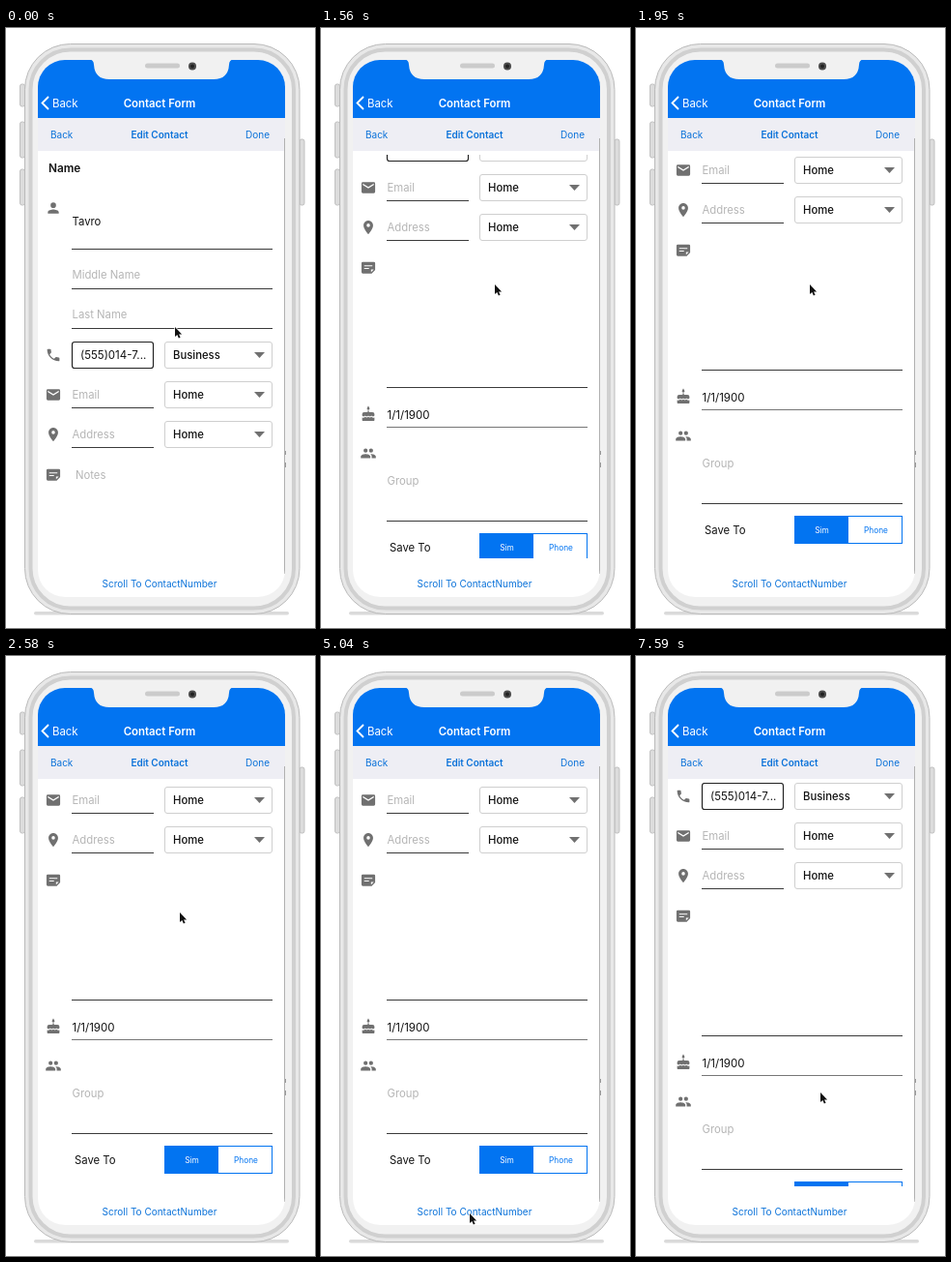
An HTML page with a canvas for the animation above (7.62 s loop, 320 px wide and 620 px high).

```html
<!DOCTYPE html>
<html lang="en">
<head>
<meta charset="utf-8">
<title>Contact form</title>
<style>
html, body { margin: 0; width: 100%; height: 100%; overflow: hidden; background: #fff; }
canvas { display: block; width: 320px; height: 620px; }
</style>
</head>
<body>
<canvas id="stage"></canvas>
<script>
const LOOP = 7620, W = 320, H = 620;
const BLUE = '#0274f1', LINK = '#0b72d9', INK = '#111', HINT = '#b5b5b5', ICON = '#707070';
const canvas = document.getElementById('stage');
const dpr = window.devicePixelRatio || 1;
canvas.width = W * dpr;
canvas.height = H * dpr;
const ctx = canvas.getContext('2d');

const icons = {
  person: 'M12 12a4 4 0 100-8 4 4 0 000 8zm0 2c-2.67 0-8 1.34-8 4v2h16v-2c0-2.66-5.33-4-8-4z',
  phone: 'M6.62 10.79c1.44 2.83 3.76 5.14 6.59 6.59l2.2-2.2c.27-.27.67-.36 1.02-.24 1.12.37 2.33.57 3.57.57.55 0 1 .45 1 1V20c0 .55-.45 1-1 1-9.39 0-17-7.61-17-17 0-.55.45-1 1-1h3.5c.55 0 1 .45 1 1 0 1.25.2 2.45.57 3.57.11.35.03.74-.25 1.02z',
  mail: 'M4 4h16a2 2 0 012 2v12a2 2 0 01-2 2H4a2 2 0 01-2-2V6a2 2 0 012-2zM20 8V6l-8 5-8-5v2l8 5z',
  place: 'M12 2C8.13 2 5 5.13 5 9c0 5.25 7 13 7 13s7-7.75 7-13c0-3.87-3.13-7-7-7zm0 9.5a2.5 2.5 0 010-5 2.5 2.5 0 010 5z',
  note: 'M4 3h16a2 2 0 012 2v10l-5 5H4a2 2 0 01-2-2V5a2 2 0 012-2zM6 8v1.5h12V8zM6 12v1.5h7V12zM16 18v-4h4z',
  cake: 'M12 6a2 2 0 002-2c0-.8-2-4-2-4s-2 3.2-2 4a2 2 0 002 2zM11 7h2v2h5a3 3 0 013 3v2q-2 2.5-4.5 0-2.2 2.5-4.5 0-2.3 2.5-4.5 0-2.5 2.5-4.5 0v-2a3 3 0 013-3h5zM3 17q2.5 1 4.5-1 2.2 2 4.5 0 2.3 2 4.5 0 2 2 4.5 1v4a1 1 0 01-1 1H4a1 1 0 01-1-1z',
  people: 'M16 11a3 3 0 100-6 3 3 0 000 6zM8 11a3 3 0 100-6 3 3 0 000 6zm0 2c-2.33 0-7 1.17-7 3.5V19h14v-2.5c0-2.33-4.67-3.5-7-3.5zm8 0l-.97.05c1.16.84 1.97 1.97 1.97 3.45V19h6v-2.5c0-2.33-4.67-3.5-7-3.5z'
};
for (const name in icons) icons[name] = new Path2D(icons[name]);
const pointer = new Path2D('M0 0V11.2L2.6 8.9 4.3 12.8 6.2 12 4.5 8.2H7.9Z');

function text(str, x, y, color = INK, size = 11.3, weight = 400, align = 'left') {
  ctx.font = `${weight} ${size}px Inter, "Open Sans", sans-serif`;
  ctx.textAlign = align;
  ctx.textBaseline = 'alphabetic';
  ctx.fillStyle = color;
  ctx.fillText(str, x, y + size * 0.363);
}

function rect(x, y, w, h, color) {
  ctx.fillStyle = color;
  ctx.fillRect(x, y, w, h);
}

function round(x, y, w, h, r, fill, stroke, width = 1) {
  ctx.beginPath();
  ctx.roundRect(x, y, w, h, r);
  if (fill) { ctx.fillStyle = fill; ctx.fill(); }
  if (stroke) { ctx.strokeStyle = stroke; ctx.lineWidth = width; ctx.stroke(); }
}

function dot(x, y, r, color) {
  ctx.beginPath();
  ctx.arc(x, y, r, 0, Math.PI * 2);
  ctx.fillStyle = color;
  ctx.fill();
}

function icon(name, y) {
  ctx.save();
  ctx.translate(49, y);
  ctx.scale(0.708, 0.708);
  ctx.translate(-12, -12);
  ctx.fillStyle = ICON;
  ctx.fill(icons[name], 'evenodd');
  ctx.restore();
}

const rule = (y, right = 276, color = '#3a3a3a') => rect(68, y, right - 68, 1, color);

function picker(label, y) {
  round(164.5, y - 13.5, 111, 27, 2.5, '#fff', '#cfcfcf');
  text(label, 173, y, INK, 11.3, 500);
  ctx.beginPath();
  ctx.moveTo(257, y - 3);
  ctx.lineTo(268, y - 3);
  ctx.lineTo(262.5, y + 3);
  ctx.fillStyle = ICON;
  ctx.fill();
}

function form(scroll) {
  ctx.save();
  ctx.beginPath();
  ctx.rect(33, 131, 256, 417);
  ctx.clip();
  ctx.translate(0, -scroll);
  text('Name', 44, 145, INK, 11.8, 600);
  icon('person', 186);
  text('Tavro', 68.5, 200);
  rule(228);
  text('Middle Name', 68.5, 255, HINT);
  rule(269);
  text('Last Name', 68.5, 296, HINT);
  rule(310);

  icon('phone', 338);
  round(68.5, 324.5, 84, 27, 2.5, '#fff', '#222', 1.2);
  text('(555)014-7...', 77, 338, INK, 11.5);
  picker('Business', 338);
  icon('mail', 379);
  text('Email', 68.5, 379, HINT);
  rule(392, 153);
  picker('Home', 379);
  icon('place', 420);
  text('Address', 68.5, 420, HINT);
  rule(433, 153);
  picker('Home', 420);

  icon('note', 462);
  if (scroll === 0) text('Notes', 72, 461.5, HINT);
  rule(585);
  icon('cake', 613);
  text('1/1/1900', 68.5, 613.5, INK, 11.5);
  rule(626, 276, '#777');
  icon('people', 653.5);
  text('Group', 68.5, 681.5, HINT);
  rule(723);
  text('Save To', 71, 751, INK, 11.3);
  rect(164, 736, 56, 29, BLUE);
  ctx.strokeStyle = BLUE;
  ctx.lineWidth = 1;
  ctx.strokeRect(164.5, 736.5, 111, 28);
  text('Sim', 192.5, 751, '#fff', 8.3, 400, 'center');
  text('Phone', 248.5, 751, BLUE, 8.3, 400, 'center');
  ctx.restore();
}

function body() {
  for (const [y, h] of [[58, 23], [97, 37], [146, 37]]) round(14.5, y, 5, h, 2, '#dcdcdc', '#c0c0c0');
  round(304, 115, 5, 68, 2, '#dcdcdc', '#c0c0c0');
  round(29, 603, 264, 3.5, 1.7, '#dadada');
  round(19.5, 16.5, 284.5, 589, 47, '#e8e8e8', '#bababa');
  round(25.5, 22.5, 272.5, 577, 41, '#f1f1f1', '#d0d0d0', 4);
}

function notch() {
  ctx.beginPath();
  ctx.moveTo(86, 32);
  ctx.quadraticCurveTo(91, 33, 91, 38);
  ctx.quadraticCurveTo(92, 53, 107, 53);
  ctx.lineTo(215, 53);
  ctx.quadraticCurveTo(230, 53, 231, 38);
  ctx.quadraticCurveTo(231, 33, 236, 32);
  ctx.fillStyle = '#f1f1f1';
  ctx.fill();
  round(144, 36.5, 36, 5, 2.5, '#cbcbcb');
  dot(193, 39.5, 4, '#4a4a4a');
  dot(193, 39.5, 2, '#222');
}

function screen(scroll) {
  ctx.save();
  ctx.beginPath();
  ctx.roundRect(33, 33, 256, 555, 28);
  ctx.clip();
  rect(33, 33, 256, 555, '#fff');
  form(scroll);
  rect(33, 33, 256, 60, BLUE);
  rect(33, 93, 256, 34, '#eeeef4');
  rect(288, 114, 1, 450, '#b0b0b0');
  ctx.restore();

  ctx.beginPath();
  ctx.moveTo(44, 71);
  ctx.lineTo(37.5, 77.5);
  ctx.lineTo(44, 84);
  ctx.strokeStyle = '#fff';
  ctx.lineWidth = 1.8;
  ctx.stroke();
  text('Back', 48, 78, '#fff', 11.4);
  text('Contact Form', 159, 78, '#fff', 11.4, 600, 'center');
  text('Back', 46, 110.5, LINK, 10);
  text('Edit Contact', 159, 110.5, LINK, 10, 600, 'center');
  text('Done', 273, 110.5, LINK, 10, 400, 'right');
  text('Scroll To ContactNumber', 159, 574, LINK, 10, 400, 'center');
  rect(289, 437, 1, 4, '#999');
  rect(289, 449, 1, 5, '#999');
}

const clamp = u => Math.max(0, Math.min(1, u));
function ease(t, from, to) {
  const u = clamp((t - from) / (to - from));
  return u * u * (3 - 2 * u);
}

// Flick to the end, rubber-band back, then glide to the phone row.
function scrollAt(t) {
  const start = 1340, hit = 1580, end = 230, speed = 0.77;
  if (t < start) return 0;
  if (t < hit) {
    const span = hit - start, u = (t - start) / span;
    return end * u * u * (3 - 2 * u)
      + span * 0.12 * u * (1 - u) ** 2
      + span * speed * u * u * (u - 1);
  }
  const s = t - hit;
  return end + speed * s * Math.exp(-s / 72) - 37 * ease(t, 5420, 5720);
}

function cursor(t) {
  const a = ease(t, 150, 1000), b = ease(t, 4150, 4950), c = ease(t, 6350, 7150);
  const x = 175 + 5 * a - 26 * b + 37 * c;
  const y = 309 - 44 * a + 311 * b - 125 * c;
  const pressed = t >= 5400 && t < 6350;
  const size = pressed ? 0.3 : 0.9;
  ctx.save();
  ctx.translate(x, y);
  ctx.scale(size, size);
  ctx.lineJoin = 'round';
  ctx.strokeStyle = '#fff';
  ctx.lineWidth = 1.6;
  ctx.stroke(pointer);
  ctx.fillStyle = '#111';
  ctx.fill(pointer);
  ctx.restore();
}

const origin = performance.now();
function frame(now) {
  const t = Math.max(0, now - origin) % LOOP;
  ctx.setTransform(dpr, 0, 0, dpr, 0, 0);
  rect(0, 0, W, H, '#fff');
  body();
  screen(Math.round(scrollAt(t)));
  notch();
  cursor(t);
  requestAnimationFrame(frame);
}
frame(origin);
</script>
</body>
</html>
```
